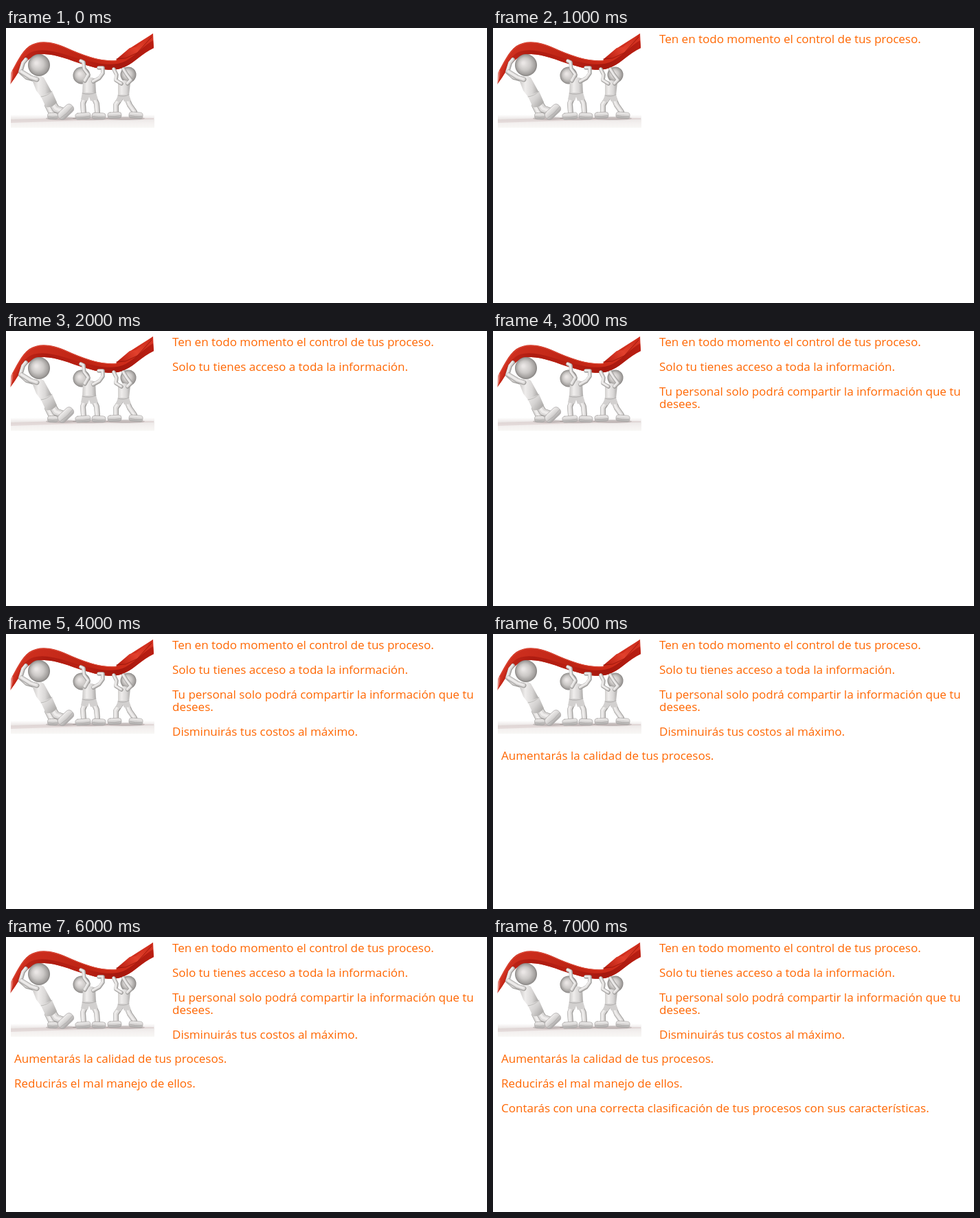
Recreate the animation shown at these times as an HTML page with a canvas. Size 700 by 400 pixels, loop 8 s.

```html
<!DOCTYPE html>
<html lang="es">
<head>
<meta charset="utf-8">
<style>
  html, body { margin: 0; width: 100%; height: 100%; overflow: hidden; background: #fff; }
  canvas { display: block; }
</style>
</head>
<body>
<canvas id="stage" width="700" height="400"></canvas>
<script>
const ctx = document.getElementById('stage').getContext('2d');
const LOOP = 8000, STEP = 1000;

// step at which the line appears, left edge, baseline, text
const LINES = [
  [1, 242, 22, 'Ten en todo momento el control de tus proceso.'],
  [2, 242, 58, 'Solo tu tienes acceso a toda la información.'],
  [3, 242, 94, 'Tu personal solo podrá compartir la información que tu'],
  [3, 242, 112, 'desees.'],
  [4, 242, 148, 'Disminuirás tus costos al máximo.'],
  [5, 12, 183, 'Aumentarás la calidad de tus procesos.'],
  [6, 12, 219, 'Reducirás el mal manejo de ellos.'],
  [7, 12, 255, 'Contarás con una correcta clasificación de tus procesos con sus características.']
];

function linear(x0, y0, x1, y1, ...colors) {
  const g = ctx.createLinearGradient(x0, y0, x1, y1);
  colors.forEach((c, i) => g.addColorStop(i / (colors.length - 1), c));
  return g;
}

function shape(d, fill) {
  ctx.fillStyle = fill;
  ctx.fill(new Path2D(d));
}

function stroke(d, color, width) {
  ctx.strokeStyle = color;
  ctx.lineWidth = width;
  ctx.stroke(new Path2D(d));
}

function limb(d, width) {
  stroke(d, '#a3a19f', width);
  ctx.save();
  ctx.translate(-0.5, -0.5);
  stroke(d, '#dad8d7', width - 1.8);
  ctx.translate(-0.6, -0.4);
  stroke(d, '#eeeceb', width * 0.35);
  ctx.restore();
}

function head(x, y, r) {
  const g = ctx.createRadialGradient(x - r * 0.25, y - r * 0.2, r * 0.1, x, y, r);
  g.addColorStop(0, '#eae6e5');
  g.addColorStop(0.5, '#cbc8c6');
  g.addColorStop(0.85, '#a3a09e');
  g.addColorStop(1, '#858280');
  ctx.fillStyle = g;
  ctx.beginPath();
  ctx.arc(x, y, r, 0, Math.PI * 2);
  ctx.fill();
}

function shoe(x, y, w, h, angle = 0) {
  ctx.save();
  ctx.translate(x, y);
  ctx.rotate(angle);
  ctx.fillStyle = linear(0, -h / 2, 0, h / 2, '#f1efee', '#d5d3d2', '#a9a7a6');
  ctx.beginPath();
  ctx.roundRect(-w / 2, -h / 2, w, h, h * 0.42);
  ctx.fill();
  ctx.strokeStyle = '#a8a5a4';
  ctx.lineWidth = 0.7;
  ctx.stroke();
  ctx.beginPath();
  ctx.moveTo(-w / 2 + 1, h * 0.1);
  ctx.quadraticCurveTo(0, h * 0.3, w / 2 - 1, h * 0.1);
  ctx.stroke();
  ctx.restore();
}

function body(d, x0, x1) {
  shape(d, linear(x0, 0, x1, 0, '#c4c2c0', '#efedec', '#d9d7d6', '#a4a2a0'));
}

function ground() {
  ctx.fillStyle = linear(0, 126, 0, 145, '#ffffff', '#ece8e7', '#f4f1f0', '#f8f7f5');
  ctx.fillRect(7, 126, 209, 19);
  shape('M7 133Q110 129 215 131L215 133Q110 134 7 138Z', 'rgba(190,165,165,.28)');
  for (const [x, w] of [[80, 22], [123, 26], [174, 28]]) {
    ctx.fillStyle = 'rgba(135,125,125,.35)';
    ctx.beginPath();
    ctx.ellipse(x, 131.5, w, 2.5, 0, 0, Math.PI * 2);
    ctx.fill();
  }
}

function ribbon() {
  shape('M6 82L7 65C15 52 22 34 34 26C48 17 67 19 89 29C112 39 136 49 160 47L181 29L214 8L215 29' +
        'C198 37 187 50 174 56C157 65 137 60 113 53C87 45 60 32 40 41C25 49 16 70 6 82Z',
        linear(7, 0, 215, 0, '#d0301f', '#c92c1c', '#bd2414', '#cc2a18', '#d53322'));
  shape('M6 82C16 61 22 42 37 35C60 26 91 42 116 47C139 53 158 56 174 48C190 39 201 25 214 18L215 29' +
        'C198 37 187 50 174 56C157 65 137 60 113 53C87 45 60 32 40 41C25 49 16 70 6 82Z',
        linear(7, 0, 215, 0, '#c6291a', '#ae1c11', '#b92013', '#a5180e', '#b91e12'));
  shape('M160 46L180 29L189 28L214 8L211 15L191 36L174 44Z',
        linear(160, 45, 214, 9, '#b51c10', '#e2402c', '#c72818'));
  stroke('M8 65C16 52 23 35 35 27C48 18 67 20 89 30C112 40 136 49 160 48', '#df4b38', 1);
  stroke('M161 45L174 44L191 36L212 13', '#941509', 0.8);
  shape('M4 62L12 62L6 84L4 84Z', linear(4, 0, 11, 0, '#fff', 'rgba(255,255,255,0)'));
}

function leftFigure() {
  limb('M44 76L30 72L21 64L25 51L29 46', 6);
  limb('M61 112L66 122L68 126', 10);
  shoe(68, 128, 15, 9);
  limb('M65 105L73 118L82 121', 11);
  shoe(87, 122, 26, 13, -0.75);
  body('M37 73Q46 66 55 72L67 94L54 104L44 91Z', 37, 67);
  shape('M51 100L67 92L74 108Q67 117 58 115Z', linear(52, 95, 73, 110, '#ebe9e8', '#d4d2d1', '#aaa8a6'));
  stroke('M51 100Q60 99 67 92', '#b2b0ae', 0.8);
  limb('M45 75L36 72L23 64', 7);
  head(48, 54, 16);
}

function middleFigure() {
  head(110, 69, 12.5);
  limb('M117 97L112 110L113 123', 8);
  limb('M126 97L132 110L133 122', 8);
  shoe(112, 128, 22, 9, -0.08);
  shoe(135, 128, 20, 9, 0.05);
  body('M112 74Q122 69 130 74L131 95L111 96Z', 110, 132);
  shape('M111 94L131 94L134 104L123 106L121 100L119 106L109 104Z', '#d2d0cf');
  stroke('M111 95Q121 98 131 94', '#aaa8a6', 0.8);
  limb('M115 77L120 68L114 60L113 50L109 48', 5.5);
  limb('M127 78L136 73L141 66L141 58L135 58', 5.5);
}

function rightFigure() {
  head(178, 68, 11.5);
  limb('M168 100L160 112L160 123', 8);
  limb('M175 100L180 112L187 122', 8);
  shoe(158, 127, 20, 9, -0.05);
  shoe(189, 127, 20, 9, 0.08);
  body('M163 79Q171 73 181 79L179 98L163 98Z', 161, 182);
  shape('M163 97L179 97L182 106L172 107L170 103L167 108L160 106Z', '#d2d0cf');
  stroke('M163 98Q171 101 179 97', '#aaa8a6', 0.8);
  limb('M168 81L160 76L161 68L157 60', 5.5);
  limb('M177 81L182 76L176 68L171 60', 5.5);
}

function draw(step) {
  ctx.fillStyle = '#fff';
  ctx.fillRect(0, 0, 700, 400);
  ctx.lineCap = ctx.lineJoin = 'round';
  ground();
  ribbon();
  leftFigure();
  middleFigure();
  rightFigure();

  ctx.font = '17px "Open Sans", "Noto Sans", sans-serif';
  ctx.fillStyle = '#ff6600';
  for (const [from, x, y, text] of LINES) {
    if (step >= from) ctx.fillText(text, x, y);
  }
}

let start = null;
function tick(now) {
  if (start === null) start = now;
  draw(Math.floor(((now - start) % LOOP) / STEP));
  requestAnimationFrame(tick);
}
draw(0);
requestAnimationFrame(tick);
</script>
</body>
</html>
```
